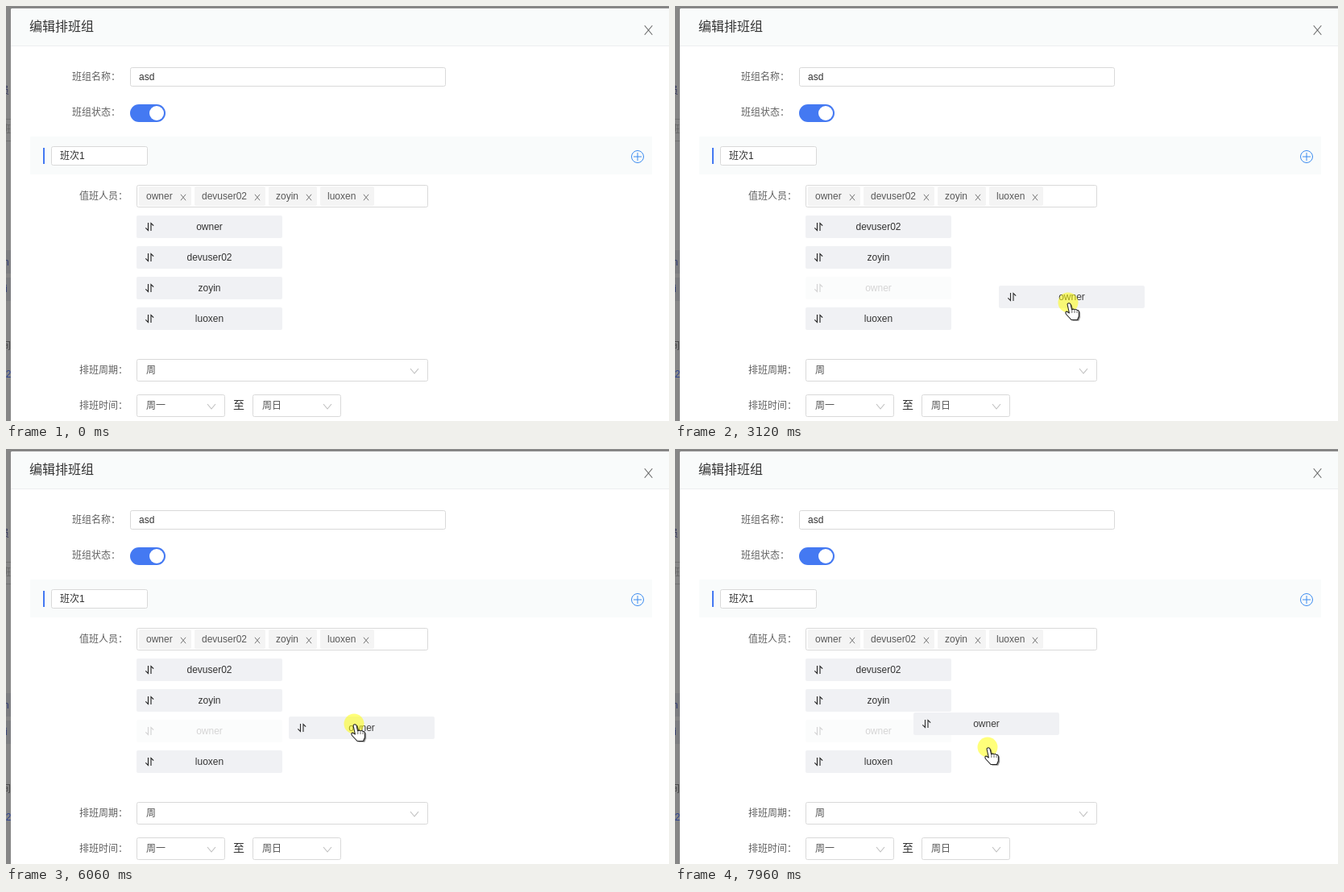
Animation of 823x515 px, one loop 8000 ms. Source, as an HTML page:

```html
<!DOCTYPE html>
<html lang="zh-CN">
<head>
<meta charset="utf-8">
<title>编辑排班组</title>
<style>
  html, body { margin: 0; width: 100%; height: 100%; overflow: hidden; background: #fff; }
  svg { display: block; font: 12px "Liberation Sans", Arial, "Noto Sans CJK SC", "Noto Sans CJK", sans-serif; }
  .line { fill: none; }
</style>
</head>
<body>
<svg id="stage" width="823" height="515" viewBox="0 0 823 515"></svg>
<script>
const NS = 'http://www.w3.org/2000/svg';
const stage = document.getElementById('stage');
const LOOP = 8000, FRAME = 69, DRAG_START = 1480;
const BLUE = '#4479f2', PALE = '#f9fbfb';

function add(parent, tag, attrs, content) {
  const el = document.createElementNS(NS, tag);
  for (const key in attrs) el.setAttribute(key, attrs[key]);
  if (content !== undefined) el.textContent = content;
  parent.append(el);
  return el;
}
const rect = (x, y, width, height, fill, rx = 0, parent = stage) =>
  add(parent, 'rect', { x, y, width, height, fill, rx });
const circle = (cx, cy, r, attrs) => add(stage, 'circle', { cx, cy, r, ...attrs });
const text = (x, y, content, fill = '#333', attrs = {}, parent = stage) =>
  add(parent, 'text', { x, y, fill, ...attrs }, content);
const line = (d, stroke, width = 1, parent = stage) =>
  add(parent, 'path', { d, stroke, 'stroke-width': width, class: 'line' });
const label = (x, y, content) => text(x, y, content + '：', '#606060');
const field = (x, y, width, height) =>
  add(stage, 'rect', { x: x + .5, y: y + .5, width: width - 1, height: height - 1, rx: 2, fill: '#fff', stroke: '#d9d9d9' });
const cross = (x, y, r, color, width) => {
  const h = r * 1.2;
  line(`M${x - r} ${y - h}l${2 * r} ${2 * h}m0 ${-2 * h}l${-2 * r} ${2 * h}`, color, width);
};
function select(x, y, width, content) {
  field(x, y, width, 28);
  text(x + 12, y + 18, content, '#555');
  line(`M${x + width - 22} ${y + 12}l5 6 5 -6`, '#bfbfbf', 1.1);
}
const place = (el, [x, y]) => el.setAttribute('transform', `translate(${x} ${y})`);
const show = (el, on) => el.setAttribute('visibility', on ? 'visible' : 'hidden');

const names = ['owner', 'devuser02', 'zoyin', 'luoxen'];

function drawPage() {
  // dimmed page behind the dialog
  rect(0, 0, 823, 515, '#868686');
  rect(0, 303, 6, 29, '#7c7d80');
  rect(0, 337, 6, 29, '#7c7d80');
  line('M0 140.5H6M0 167.5H6', '#707070');
  text(-8, 109, '员', '#34365c');
  text(-6, 157, '班', '#666');
  text(-3, 322, 'n', '#2e3a70');
  text(-7, 355, 'yi', '#2e3a70');
  text(-6, 426, '间', '#444');
  text(-7, 461, '12', '#2e4390');

  // dialog and header
  rect(6, 3, 830, 530, '#fff', 2);
  rect(6, 3, 830, 46, PALE, 2);
  rect(6, 49, 817, 1, '#eceff0');
  text(29, 31, '编辑排班组', '#333', { 'font-size': 16 });
  cross(797.5, 30, 4.8, '#666', 1.1);

  label(82, 92, '班组名称');
  field(154, 76, 392, 24);
  text(165, 92, 'asd');
  label(82, 136, '班组状态');
  rect(154, 122, 44, 22, BLUE, 11);
  circle(187, 133, 9, { fill: '#fff' });

  // shift band
  rect(30, 162, 772, 47, PALE);
  rect(46, 176, 2, 20, BLUE);
  field(56, 174, 120, 24);
  text(67, 190, '班次1');
  circle(784, 187, 7.5, { fill: 'none', stroke: '#3c8cf0' });
  line('M779 187H789M784 182V192', '#3c8cf0');

  // selected people, each tag as wide as its name
  label(91, 240, '值班人员');
  field(162, 222, 362, 28);
  let x = 165;
  for (const name of names) {
    const tag = rect(x, 224, 0, 24, '#f4f4f4', 2);
    const width = Math.round(text(x + 9, 240, name, '#595959').getComputedTextLength()) + 32;
    tag.setAttribute('width', width);
    cross(x + width - 10, 237.5, 3.1, '#777', 1);
    x += width + 4;
  }

  // period and time
  label(91, 456, '排班周期');
  select(162, 438, 362, '周');
  label(91, 500, '排班时间');
  select(162, 482, 110, '周一');
  text(282, 500, '至', '#333', { 'font-size': 14 });
  select(306, 482, 110, '周日');
}

function makeRow(name) {
  const row = add(stage, 'g', {});
  rect(0, 0, 181, 28, '#f0f1f4', 2, row);
  line('M14.5 9V18.5L11.3 15.3M18 19V9.5L21.2 12.7', '#222', 1.1, row);
  text(90.5, 18, name, '#333', { 'text-anchor': 'middle' }, row);
  return row;
}

function makeHand() {
  const d = 'M-1 2Q1 -.5 3 2L4.6 9Q6.5 7.3 8 9Q10 7.8 11 9.6Q13 9 13.4 11.5V17L11.5 21.5H4L-2.5 14.5Q-4 11.6 -1.8 11L1.4 13Z';
  const hand = add(stage, 'g', {});
  add(hand, 'path', { d, fill: '#000', opacity: .42, transform: 'translate(1.8 1.3)' });
  add(hand, 'path', { d, fill: '#fff', stroke: '#222', 'stroke-width': 1.1, 'stroke-linejoin': 'round' });
  line('M4.8 9.5V13M8 10V13M11 10.5V13', '#444', .8, hand);
  return hand;
}

// Each move starts where the last one ended; `via` bends it, `slot` is where the dragged row lands.
const moves = [
  { start: 70, end: 270, to: [799, 494] },
  { start: 420, end: 470, to: [803, 492] },
  { start: 670, end: 1280, to: [247, 274], via: [590, 312] },
  { start: DRAG_START, end: 2100, to: [261, 311], via: [262, 306], slot: 1 },
  { start: 2240, end: 2990, to: [486, 354], via: [330, 350], slot: 2 },
  { start: 3050, end: 3340, to: [490, 388] },
  { start: 3600, end: 4340, to: [385, 398], via: [432, 398], slot: 3 },
  { start: 4410, end: 4480, to: [381, 398] },
  { start: 4680, end: 5070, to: [490, 362] },
  { start: 5140, end: 5450, to: [438, 347], via: [438, 342] },
  { start: 5510, end: 5790, to: [439, 351], slot: 2 },
  { start: 5990, end: 6750, to: [410, 315], via: [418, 318], slot: 1 },
  { start: 6810, end: 7550, to: [400, 277], slot: 0 },
  { start: 7620, end: 7960, to: [388, 370], via: [361, 276], slot: 2 }
];

const lerp = (a, b, u) => a + (b - a) * u;
const mix = (p, q, u) => [lerp(p[0], q[0], u), lerp(p[1], q[1], u)];

let last = { to: [800, 530], slot: 0 };
for (const move of moves) {
  move.from = last.to;
  move.fromSlot = last.slot;
  move.slot ??= last.slot;
  move.via ??= mix(move.from, move.to, .5);
  last = move;
}

function along({ from, via, to }, u) {
  return mix(mix(from, via, u), mix(via, to, u), u).map(Math.round);
}

// The picture advances in steps; the held row trails the pointer by one step.
function poseAt(t) {
  const move = moves.filter(m => m.start <= t).pop();
  if (!move) return { hand: moves[0].from, held: moves[0].from, slot: 0 };
  const gaps = Math.round((move.end - move.start) / FRAME);
  const step = Math.floor((t - move.start) * gaps / (move.end - move.start) + .2);
  const progress = n => Math.min(1, n / (gaps + 1));
  return {
    hand: along(move, progress(step + 1)),
    held: along(move, progress(step)),
    slot: Math.round(lerp(move.fromSlot, move.slot, progress(step + 1)))
  };
}

drawPage();
const rows = names.map(makeRow);
const floating = makeRow(names[0]);
floating.setAttribute('opacity', .95);
const halo = circle(0, 0, 12.5, { fill: '#ff0', opacity: .52 });
const hand = makeHand();

function render(t) {
  const pose = poseAt(t);
  const dragging = t >= DRAG_START;
  const click = moves[1];

  const order = rows.slice(1);
  order.splice(pose.slot, 0, rows[0]);
  order.forEach((row, i) => place(row, [162, 260 + 38 * i]));
  rows[0].setAttribute('opacity', dragging ? .2 : 1);

  show(floating, dragging);
  place(floating, [pose.held[0] - 85, pose.held[1] - 14]);
  show(halo, dragging || (t >= click.start && t < click.end));
  place(halo, pose.hand);
  place(hand, pose.hand);
}

const began = performance.now();
function tick() {
  render((performance.now() - began) % LOOP);
  requestAnimationFrame(tick);
}
tick();
</script>
</body>
</html>
```
